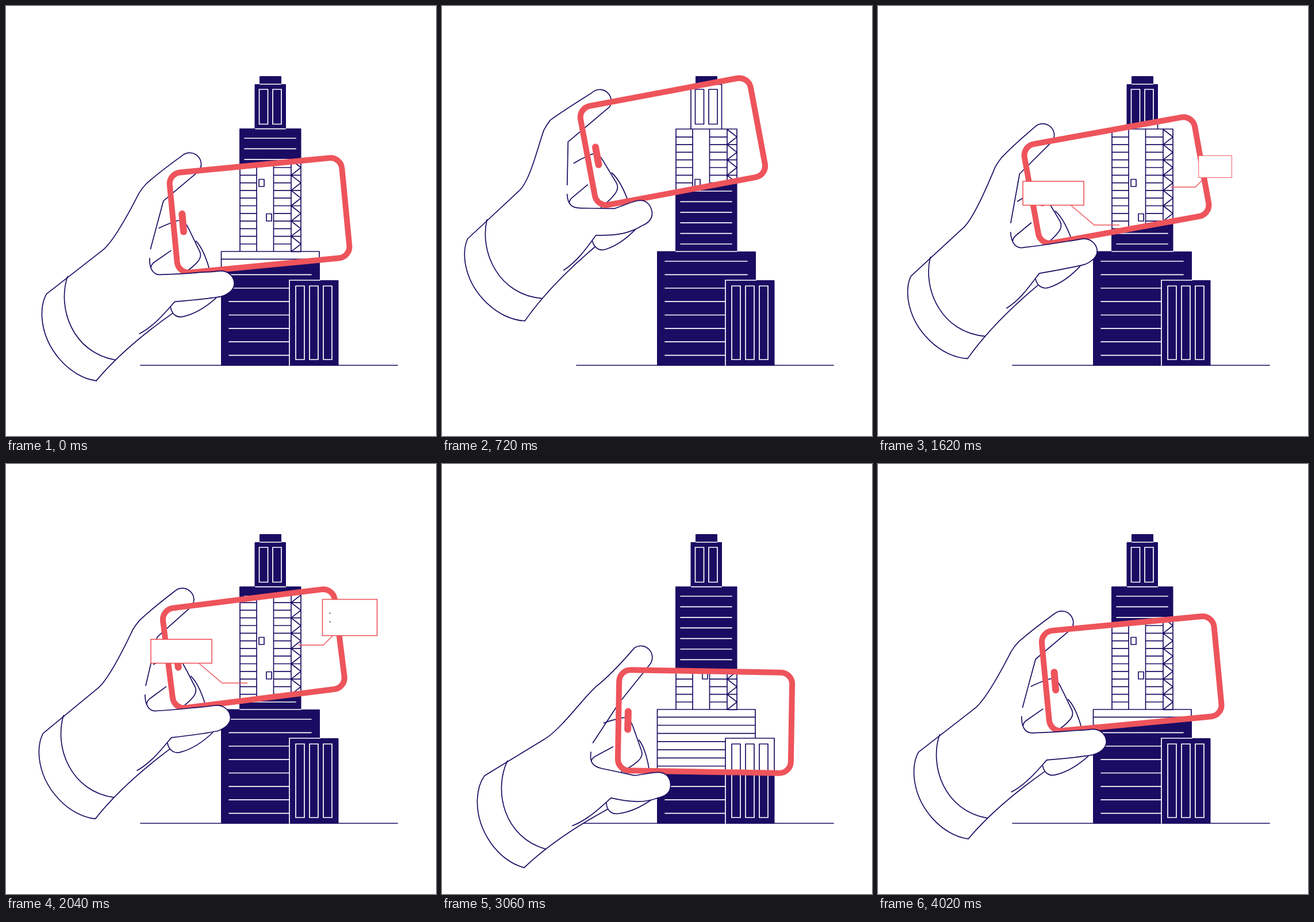
These frames come from a looping animation (748 by 748 pixels, 4.05 s). An HTML page:

```html
<!DOCTYPE html>
<html lang="en">
<head>
<meta charset="utf-8">
<title>Phone scanning a tower</title>
<style>
html, body { margin: 0; width: 100%; height: 100%; overflow: hidden; background: #fff; }
svg { display: block; width: 100vw; height: 100vh; }
.ink { stroke: #1b0c63; stroke-width: 1.7; fill: #fff; stroke-linecap: round; stroke-linejoin: round; }
.open { fill: none; }
.solid { fill: #1b0c63; }
.edge { stroke: #1b0c63; stroke-linejoin: round; }
.chalk { stroke: #fff; stroke-width: 1.7; fill: none; stroke-linecap: round; }
.tag { stroke: #ee545b; stroke-width: 1.6; fill: #fff; }
.leader { stroke: #ee545b; stroke-width: 1.4; fill: none; }
.phone { stroke: #ee545b; stroke-width: 10; fill: none; }
.camera { stroke-width: 12; stroke-linecap: round; }
</style>
</head>
<body>
<svg viewBox="0 0 748 748">
  <defs>
    <clipPath id="lens"><rect id="lensRect" x="310.5" y="342.5" width="301" height="175" rx="20"/></clipPath>
  </defs>

  <path class="ink" d="M234 625H681"/>
  <path class="solid edge" d="M441.500 122.500h37v14h8v77h26.500v214H545.500v50h32.500V625H374.500V427h32V213.500h26.500v-77h8.500z"/>
  <path class="chalk" id="facade"/>

  <g clip-path="url(#lens)">
    <rect width="748" height="748" fill="#fff"/>
    <path class="ink" id="frame"/>
    <path class="ink" id="annex"/>
  </g>

  <g id="hand">
    <path fill="#fff" d="M153 692C190 655 235 622 295 587L301 567L267 472L190 463Z"/>
    <path class="ink" id="index"/>
    <path class="ink open" d="M153 692C190 655 235 622 295 587M119 507C96 560 116 640 190 659"/>
    <path class="ink" d="M293 576C294 588 302 596 314 594C335 591 357 579 373 567"/>
    <path class="ink open" d="M285 437Q300 431 318 427C332 425 334 438 341 455L352 484Q355 493 347 501Q338 510 318 521
      M347 465C356 476 362 495 366 516M302 478L274 494Q266 498 265 504"/>
    <rect class="phone" x="310.5" y="342.5" width="301" height="175" rx="20" transform="rotate(-.5 461 430)"/>
    <path class="phone camera" d="M327 416V447"/>
    <path class="ink" id="thumb"/>
  </g>

  <path class="leader" pathLength="1" d="M420 381H376L336 347"/>
  <path class="leader" pathLength="1" d="M509 315H552L569 298"/>
  <g id="leftTag"><rect class="tag" x="252" y="305" width="106" height="41.500"/></g>
  <g id="rightTag">
    <rect class="tag" x="550.500" y="235.500" width="95" height="63"/>
    <g class="solid" id="dots"><circle cx="563.5" cy="259.500" r="1"/><circle cx="563.5" cy="274.500" r="1"/></g>
  </g>
</svg>
<script>
const LOOP = 4050, STEP = 30;
const $ = id => document.getElementById(id);
const lerp = (a, b, p) => a + (b - a) * p;
const ramp = (t, from, to) => {
  const p = Math.min(1, Math.max(0, (t - from) / (to - from)));
  return p * p * (3 - 2 * p);
};

// Building lines
const hLine = (x1, x2, y) => `M${x1} ${y}H${x2}`;
const box = (x, y, w, h) => `M${x} ${y}h${w}v${h}h${-w}z`;
const repeat = (n, draw) => Array.from({ length: n }, (_, i) => draw(i)).join('');
const topWindows = box(440.5, 145, 15, 60.5) + box(464, 145, 15, 60.5);
const annexWindows = repeat(3, i => box(504 + 24 * i, 487, 15, 128));

$('facade').setAttribute('d',
  hLine(442, 478, 136) + hLine(434, 486, 213.7) + hLine(407, 513, 427) +
  topWindows + annexWindows +
  repeat(11, i => hLine(415, 504, 230 + 18.4 * i)) +
  repeat(8, i => hLine(388, i < 2 ? 531 : 493, 444 + 23.37 * i)) +
  'M493 625V477H546');

const floorY = i => 214.5 + 13.3 * i;
$('frame').setAttribute('d',
  box(441.5, 123, 37, 13) + box(433, 136.5, 53.5, 77.5) + topWindows +
  box(407, 214, 106, 213) + 'M436 214V427M465.5 214V427M496 214V427' +
  repeat(15, i => hLine(407, 436, floorY(i + 1)) + hLine(465.5, 496, floorY(i + 1))) +
  repeat(8, i => `M496 ${floorY(2 * i)}L513 ${floorY(2 * i + 1)}L496 ${floorY(2 * i + 2)}H513`) +
  box(440, 301.5, 9, 12.5) + box(453, 361.5, 9, 12.5) +
  box(374.5, 427, 170.5, 198) + repeat(13, i => hLine(374.5, 545, 440.3 + 14.2 * i)));
$('annex').setAttribute('d', box(493, 477, 85, 148) + annexWindows);

// Phone centre and tilt, thumb bend (0 to 1) and index finger curl (0 to 3)
const rest = { x: 441, y: 364, tilt: -5.5, bend: 0, curl: 2 };
const poses = [
  { t: 0, ...rest },
  { t: 720, x: 401.4, y: 235.8, tilt: -10.6, bend: 1, curl: 3 },
  { t: 1620, x: 415, y: 303, tilt: -10.25, bend: 0, curl: 2 },
  { t: 2430, x: 445, y: 337.5, tilt: -4.4, bend: 0, curl: 2 },
  { t: 3060, x: 457.5, y: 448, tilt: 0.95, bend: 1, curl: 0 },
  { t: 3510, x: 461, y: 430, tilt: -0.5, bend: 1, curl: 1 },
  { t: LOOP, ...rest }
];

function poseAt(t) {
  const next = poses.findIndex(pose => pose.t > t);
  const from = poses[next - 1], to = poses[next];
  const p = ramp(t, from.t, to.t);
  return Object.fromEntries(Object.keys(rest).map(k => [k, lerp(from[k], to[k], p)]));
}

function indexPath(c) {
  const knuckle = { x: 262 + 8 * c - 4 * c * c, y: 382 - 13 * c + 2.2 * c * c };
  const tip = { x: 348 + 0.6 * c, y: 320 + 3.3 * c + 0.8 * c * c };
  const inner = { x: 311 - 2 * c - 2.6 * c * c, y: 401 - 14 * c + 4.4 * c * c };
  const bow = Math.min(c, 2) / 2;
  const { x, y } = knuckle;
  return `M153 692C108 682 68 630 68.500 575C69 557 73 544 80 534L182 468` +
    `C205 455 ${x - 18} ${y + 20 + 7 * bow} ${x - 6} ${y + 7 + bow}Q${x} ${y} ${x + 8} ${y - 8 + bow}` +
    `Q${lerp(x, tip.x, 0.4) - 4 * bow} ${lerp(y, tip.y, 0.4) - 5 - 5 * bow} ${tip.x - 13} ${tip.y - 15}` +
    `A20 20 0 0 1 ${tip.x + 14} ${tip.y + 14}L${inner.x} ${inner.y}L267 472`;
}

function thumbPath(b) {
  const end = 407 - 3 * b;
  return `M264 488C262 505 267 ${519 - 6 * b} 283 ${518 - 2 * b}` +
    `C300 519 320 ${520 + 3 * b} 341 ${520 + 7 * b}C355 ${520 + 5 * b} 369 521 382 520.500` +
    `C397 520 ${end} 531 ${end} 543C${end} 555 395 562 382 565` +
    `C362 ${567 + 6 * b} 340 ${567 + 8 * b} 301 567C285 582 262 606 235 617`;
}

function scaleFrom(id, x, y, s) {
  $(id).setAttribute('transform', `translate(${x} ${y}) scale(${s}) translate(${-x} ${-y})`);
  $(id).setAttribute('visibility', s > 0.01 ? 'visible' : 'hidden');
}

const leaders = document.querySelectorAll('.leader');

function draw(t) {
  const { x, y, tilt, bend, curl } = poseAt(t);
  const move = `translate(${x} ${y}) rotate(${tilt + 0.5}) translate(-461 -430)`;
  $('hand').setAttribute('transform', move);
  $('lensRect').setAttribute('transform', move + ' rotate(-.5 461 430)');
  $('index').setAttribute('d', indexPath(curl));
  $('thumb').setAttribute('d', thumbPath(bend));

  const drawn = ramp(t, 1200, 1410) - ramp(t, 2460, 2640);
  leaders.forEach(line => {
    line.setAttribute('stroke-dasharray', `${drawn} 2`);
    line.setAttribute('visibility', drawn > 0.01 ? 'visible' : 'hidden');
  });
  scaleFrom('leftTag', 336, 346.5, ramp(t, 1380, 1590) - ramp(t, 2220, 2400));
  scaleFrom('rightTag', 569, 298.5, ramp(t, 1500, 1710) - ramp(t, 2490, 2670));
  $('dots').style.display = t >= 1740 ? '' : 'none';
}

const start = performance.now();
function tick() {
  const t = (performance.now() - start) % LOOP;
  draw(Math.floor(t / STEP) * STEP);
  requestAnimationFrame(tick);
}
tick();
</script>
</body>
</html>
```
